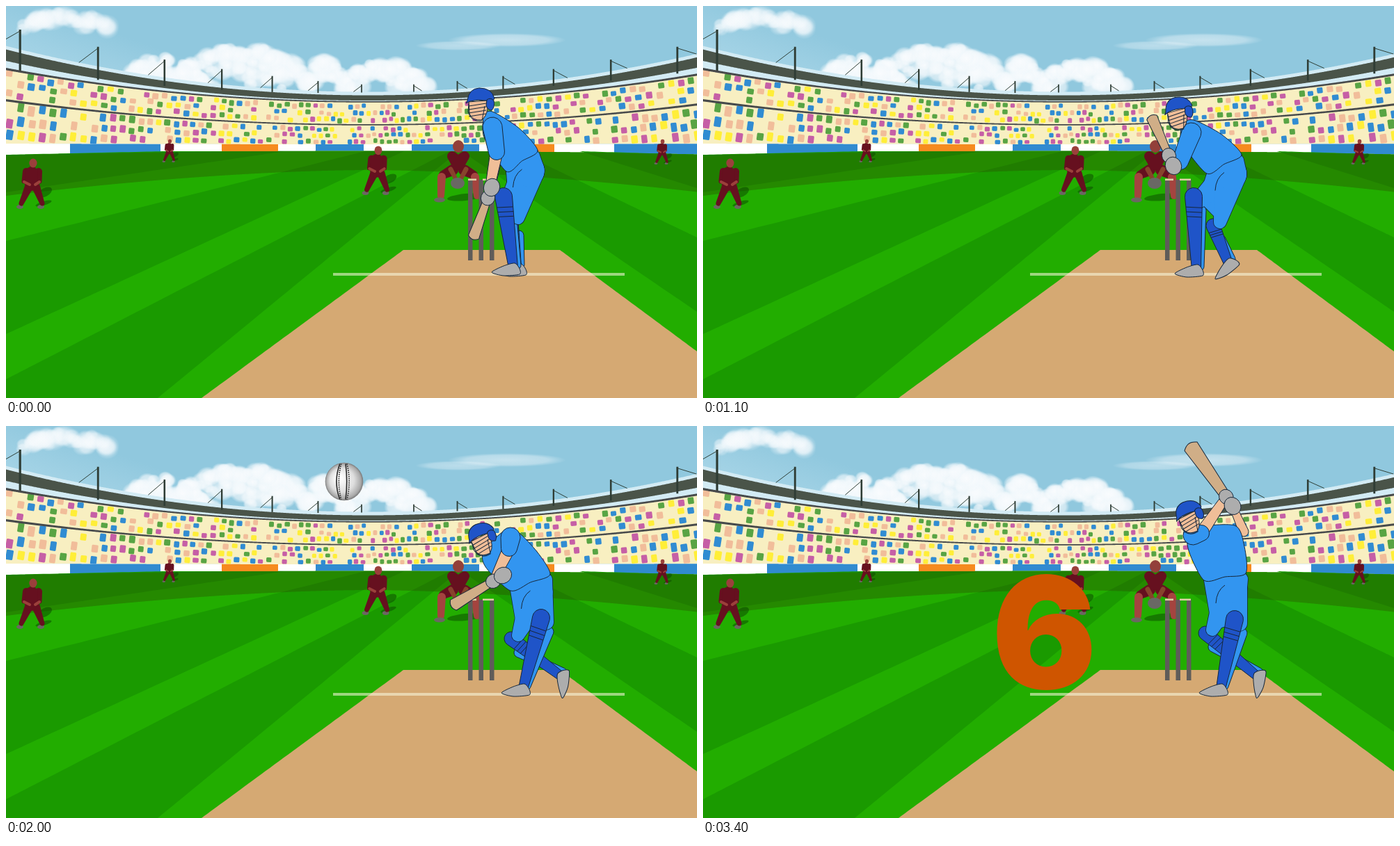
Animation, 993 px wide and 564 px high, one loop 3600 ms. Source, as an HTML page with a canvas:

```html
<!DOCTYPE html>
<html lang="en">
<head>
<meta charset="utf-8">
<title>Cricket six</title>
<style>
html, body { margin: 0; width: 100%; height: 100%; overflow: hidden; }
canvas { display: block; width: 993px; height: 564px; }
</style>
</head>
<body>
<canvas id="stage" width="993" height="564"></canvas>
<script>
const W = 993, H = 564, LOOP = 3600, RAD = Math.PI / 180;
const stage = document.getElementById('stage').getContext('2d');
const INK = '#16273a', BLUE = '#3295f0', NAVY = '#1f54c8', GREY = '#adadad', SKIN = '#f0be98';

const lerp = (a, b, f) => a + (b - a) * f;
const mix = (a, b, f) => a.map((v, i) => lerp(v, b[i], f));
const add = ([x, y], dx, dy) => [x + dx, y + dy];
const polar = ([x, y], deg, r) => [x + r * Math.cos(deg * RAD), y + r * Math.sin(deg * RAD)];

// Closed outline through points; k sets how round the corners are
function outline(points, k = 0) {
  const path = new Path2D(), n = points.length, at = i => points[(i + n) % n];
  path.moveTo(...points[0]);
  for (let i = 0; i < n; i++) {
    const [a, b, d, e] = [at(i - 1), at(i), at(i + 1), at(i + 2)];
    path.bezierCurveTo(b[0] + (d[0] - a[0]) * k, b[1] + (d[1] - a[1]) * k,
      d[0] - (e[0] - b[0]) * k, d[1] - (e[1] - b[1]) * k, ...d);
  }
  path.closePath();
  return path;
}
// Tapered limb between two round joints
function limb(a, ra, b, rb) {
  const path = new Path2D(), dx = b[0] - a[0], dy = b[1] - a[1];
  const dir = Math.atan2(dy, dx);
  const off = Math.acos(Math.max(-1, Math.min(1, (ra - rb) / Math.hypot(dx, dy))));
  path.arc(...a, ra, dir + off, dir - off + 2 * Math.PI);
  path.arc(...b, rb, dir - off, dir + off);
  path.closePath();
  return path;
}
function disc(x, y, rx, ry = rx, rot = 0) {
  const path = new Path2D();
  path.ellipse(x, y, rx, ry, rot, 0, 7);
  return path;
}
function fill(c, color, ...paths) {
  c.fillStyle = color;
  for (const p of paths) c.fill(p);
}
// Inked shape; several paths merge into one outline
function ink(c, color, ...paths) {
  c.strokeStyle = INK;
  c.lineWidth = paths.length > 1 ? 1.6 : 1;
  if (paths.length > 1) paths.forEach(p => c.stroke(p));
  fill(c, color, ...paths);
  if (paths.length === 1) c.stroke(paths[0]);
}
function line(c, color, width, a, b) {
  c.strokeStyle = color;
  c.lineWidth = width;
  c.beginPath();
  c.moveTo(...a);
  c.lineTo(...b);
  c.stroke();
}

/* ---------- ground ---------- */
let seed = 11;
const rnd = () => (seed = (seed * 16807) % 2147483647) / 2147483647;
const bow = x => ((x - 520) / 520) ** 2;
const rim = (base, rise) => x => base - rise * bow(x);
const shift = (f, d) => x => f(x) + d;
const roofTop = rim(123.5, 66), beamTop = rim(128.5, 66), beamEnd = rim(136, 57);
const standTop = rim(138, 48), aisle = rim(171, 36), boardTop = rim(199, 1), boardEnd = rim(208.5, -6);

function band(c, color, top, end, x0 = 0, x1 = W) {
  c.fillStyle = color;
  c.beginPath();
  for (let x = x0; x <= x1; x++) c.lineTo(x, top(x));
  for (let x = x1; x >= x0; x--) c.lineTo(x, end(x));
  c.fill();
}
function puff(c, x, y, rx, ry, alpha) {
  const g = c.createRadialGradient(0, 0, 0, 0, 0, 1);
  g.addColorStop(0, `rgba(250,252,254,${alpha})`);
  g.addColorStop(0.7, `rgba(244,249,252,${alpha * 0.8})`);
  g.addColorStop(1, 'rgba(236,246,251,0)');
  c.save();
  c.translate(x, y);
  c.scale(rx, ry);
  fill(c, g, disc(0, 0, 1));
  c.restore();
}
// Small puffs scattered under a dome
function cloud(c, x, base, w, h, alpha) {
  for (let i = 0; i < w; i++) {
    const u = rnd() * 2 - 1, r = 7 + rnd() * 9;
    const top = (h - r) * Math.sqrt(1 - u * u);
    puff(c, x + u * w, base - top * Math.sqrt(rnd()), r * 1.15, r, alpha);
  }
}
function sky(c) {
  const g = c.createLinearGradient(0, 140, 50, 0);
  g.addColorStop(0, '#b9dfee');
  g.addColorStop(1, '#90c8de');
  c.fillStyle = g;
  c.fillRect(0, 0, W, 210);
  cloud(c, 225, 122, 60, 58, 0.75);
  cloud(c, 340, 124, 100, 76, 0.75);
  cloud(c, 460, 124, 28, 60, 0.75);
  cloud(c, 545, 124, 62, 55, 0.75);
  cloud(c, 85, 36, 66, 38, 0.35);
  puff(c, 720, 49, 85, 10, 0.5);
  puff(c, 650, 57, 62, 7, 0.4);
}
function roof(c) {
  band(c, '#d3ebf4', roofTop, standTop);
  band(c, '#4a5449', beamTop, beamEnd);
  for (let k = 0; k < 7; k++) {
    const d = 37.5 + 62 * k + 0.55 * k ** 3, far = d / 524;
    const top = 114 - 79 * far ** 1.55;
    for (const side of [-1, 1]) {
      const x = 548.5 + side * d, foot = x + side * (10 + 22 * far);
      line(c, '#2f4038', 1, [x, top + 2], [foot, roofTop(foot)]);
      line(c, '#2f3d35', 1.6 + 1.6 * far, [x, top], [x, lerp(roofTop(x), standTop(x), far)]);
    }
  }
}
function crowd(c, top, end, rows) {
  const tints = ['#c65fa6', '#58a444', '#318cd2', '#ffee38', '#f1bd9a'];
  for (let r = 0; r < rows; r++) {
    for (let x = 0; x < W;) {
      const far = Math.sqrt(bow(x)), pitch = (end(x) - top(x)) / rows;
      const w = 5.5 + 3.5 * far + rnd() * 1.5, h = pitch * (0.6 + rnd() * 0.2);
      if (rnd() < 0.82) {
        c.save();
        c.translate(x + w / 2, top(x) + pitch * (r + 0.5) + (rnd() - 0.5) * pitch * 0.35);
        c.rotate((x < 520 ? 1 : -1) * far * 0.16);
        c.fillStyle = tints[Math.floor(rnd() * tints.length)];
        c.beginPath();
        c.roundRect(-w / 2, -h / 2, w, h, 1.6);
        c.fill();
        c.restore();
      }
      x += w + 2 + 3 * far + rnd() * 2;
    }
  }
}
function stands(c) {
  band(c, '#f8efc1', standTop, boardTop);
  crowd(c, shift(standTop, 2), shift(aisle, -2), 3);
  crowd(c, shift(aisle, 2), boardTop, 3);
  for (const edge of [standTop, aisle]) band(c, '#474a4b', shift(edge, -1), x => edge(x) + 0.8 + 1.5 * bow(x));
  band(c, '#ffffff', boardTop, boardEnd);
  for (const [a, b] of [[92, 222], [445, 514], [583, 680], [874, W]]) band(c, '#318bd0', boardTop, boardEnd, a, b);
  for (const [a, b] of [[310, 391], [738, 788]]) band(c, '#f68b1f', boardTop, boardEnd, a, b);
}
function field(c) {
  const mow = (...p) => fill(c, '#1a9a00', outline(p));
  band(c, '#22ad00', boardEnd, () => H);
  mow([0, 338], [516, 209], [572, 209], [0, 472]);
  mow([0, 537], [637, 209], [650, 209], [218, H], [0, H]);
  mow([655, 209], [735, 209], [W, 333], [W, 440]);
  mow([0, 214], [230, 209], [400, 209], [0, 268]);
  mow([825, 209], [W, 214], [W, 262]);
  band(c, 'rgba(42,72,0,.36)', boardEnd, x => 236 + 37 * bow(x) ** 0.85);
  fill(c, '#d5a973', outline([[571, 351], [796, 351], [W, 497], [W, H], [281, H]]));
  c.fillStyle = 'rgba(248,246,220,.58)';
  c.fillRect(470, 384, 419, 4);
}
function fielder(c, x, y, h) {
  const cloth = '#66101f', skin = '#9b403b', shade = 'rgba(10,70,0,.5)';
  c.save();
  c.translate(x, y);
  c.scale(h / 72, h / 72);
  fill(c, shade, disc(18, 48, 11, 6, -0.5), disc(16, 64, 12, 3, -0.3));
  for (const side of [-1, 1]) {
    const foot = side * 15 - 3;
    fill(c, '#6b6762', disc(foot, 69, 5, 3));
    fill(c, cloth, limb([side * 5, 40], 6, [foot + 2, 64], 3.5), limb([side * 9, 18], 5, [side * 11 - 1, 32], 3.5));
  }
  fill(c, cloth, limb([-1, 20], 9, [-2, 37], 9));
  for (const side of [-1, 1]) fill(c, skin, limb([side * 11 - 1, 33], 2, [side * 4, 37], 2));
  fill(c, skin, disc(1, 6, 5.6, 6.5));
  c.restore();
}
function keeper(c) {
  const cloth = '#66101f';
  fill(c, 'rgba(10,70,0,.5)', disc(660, 275, 26, 5, -0.1));
  c.save();
  c.translate(650, 0);
  for (const side of [-1, 1]) {
    fill(c, cloth, limb([side * 8, 236], 8, [side * 22, 243], 6));
    fill(c, '#a4443f', limb([side * 24, 246], 6, [side * 26 + 1, 273], 5));
    fill(c, cloth, limb([0, 226], 10, [side * 9, 216], 7));
    fill(c, '#87432c', limb([side * 11, 235], 3.5, [side * 4, 248], 3));
  }
  fill(c, '#6b6762', disc(-27, 279, 8, 3.5));
  fill(c, '#696864', disc(-1, 255, 10, 8));
  fill(c, '#93403a', disc(0, 202, 8, 9));
  c.restore();
}
function stumps(c) {
  c.fillStyle = '#5f5c59';
  for (const x of [664, 679.5, 695]) c.fillRect(x, 250, 6.5, 116);
  c.fillStyle = '#dccfa6';
  c.fillRect(664, 248.5, 12, 2.6);
  c.fillRect(685, 248.5, 16, 2.6);
}

const ground = document.createElement('canvas');
ground.width = W;
ground.height = H;
const back = ground.getContext('2d');
for (const part of [sky, roof, stands, field]) part(back);
for (const spot of [[38, 220, 72], [235, 192, 33], [534, 202, 70], [943, 192, 36]]) fielder(back, ...spot);
keeper(back);
stumps(back);

/* ---------- batsman: joints at six key times ---------- */
const TIMES = [0, 700, 1100, 1600, 2000, 2400];
const JOINTS = {
  head: '682,132 684,139 683,145 683,160 682,154 697,122',
  shoulder: '699,152 702,153 705,164 708,168 724,147 764,143',
  rear: '764,208 762,234 774,214 777,230 782,213 780,212',
  belly: '719,238 708,242 724,241 723,262 725,237 720,222',
  armTop: '699,174 697,178 702,182 703,184 725,160 704,157',
  elbow: '705,210 694,214 686,224 688,220 723,176 716,154',
  farElbow: '704,225 694,232 690,225 716,255 720,195 777,152',
  hand: '698,261 692,249 676,230 669,258 714,215 761,115',
  kneeF: '715,274 683,278 705,274 756,279 769,276 764,278',
  ankleF: '729,377 700,377 709,379 742,381 743,378 744,378',
  kneeB: '726,310 723,306 733,316 722,326 726,306 722,298',
  ankleB: '734,376 731,376 754,368 755,370 795,358 794,358',
  // angle and length
  bat: '110,80 158,57 246,80 325,45 509,87 595,110',
  // head and rear shoe
  turn: '0,0 -4,-12 -10,-35 0,-30 -22,-80 -22,-75'
};
for (const name in JOINTS) JOINTS[name] = JOINTS[name].split(' ').map(p => p.split(',').map(Number));

function poseAt(t) {
  let i = 0;
  while (i < TIMES.length - 2 && t >= TIMES[i + 1]) i++;
  const f = Math.min(1, (t - TIMES[i]) / (TIMES[i + 1] - TIMES[i]));
  const pose = {};
  for (const name in JOINTS) pose[name] = mix(JOINTS[name][i], JOINTS[name][i + 1], f);
  return pose;
}
function turned(c, [x, y], deg, draw) {
  c.save();
  c.translate(x, y);
  c.rotate(deg * RAD);
  draw();
  c.restore();
}
function drawBat(c, hand, [angle, len]) {
  const w = len * 0.1;
  turned(c, hand, angle, () => ink(c, '#d0ae87', new Path2D(
    `M10 ${-w * 0.6}L${len * 0.95} ${-w}Q${len * 1.04} 0 ${len * 0.95} ${w}L10 ${w * 0.6}Z`)));
}
function drawHead(c, at, deg) {
  turned(c, at, deg, () => {
    ink(c, SKIN, new Path2D('M-17 6L9 4L10 16Q8 28 1 32Q-12 33 -16 23Z'));
    for (let y = 8; y < 28; y += 5) line(c, INK, 1, [-17, y + 4], [8, y]);
    c.stroke(new Path2D('M-17 8L-18 20Q-14 36 2 33L6 12'));
    ink(c, NAVY, new Path2D('M-19 4Q-17 -13 -2 -14Q16 -14 20 1L18 4L8 4Q-4 2 -15 5L-21 8Z'));
    ink(c, NAVY, new Path2D('M9 3Q14 -1 19 4Q21 13 16 18Q10 18 8 11Z'));
  });
}
function drawShoe(c, ankle, deg) {
  turned(c, ankle, deg, () =>
    ink(c, GREY, outline([[-31, 6], [-14, -3], [2, -7], [9, 1], [9, 9], [-14, 11]], 0.12)));
}
function drawShin(c, knee, ankle) {
  ink(c, BLUE, limb(add(knee, 11, 20), 7, add(ankle, 5, -4), 6));
}
function drawPad(c, knee, ankle, r) {
  ink(c, NAVY, limb(knee, r, ankle, 6.5));
  const dir = Math.atan2(ankle[1] - knee[1], ankle[0] - knee[0]) / RAD;
  for (let f = 0.15; f < 0.3; f += 0.065) {
    const mid = mix(knee, ankle, f), w = lerp(r, 6.5, f);
    line(c, INK, 1, polar(mid, dir + 95, w), polar(mid, dir - 85, w));
  }
}
function drawBatsman(c, p) {
  const waist = mix(p.belly, p.rear, 0.5), hip = add(waist, 9, 14);
  const neck = add(p.head, 5, 26), chest = add(mix(neck, p.belly, 0.35), -11, 3);
  const spine = add(mix(p.shoulder, p.rear, 0.5), 6, -4);
  const grip = polar(p.hand, p.bat[0], 16);
  const thighF = add(p.kneeF, 7, 6), thighB = add(p.kneeB, 10, -5);
  c.lineJoin = 'round';

  drawBat(c, p.hand, p.bat);
  ink(c, SKIN, limb(p.farElbow, 7, p.hand, 5));
  drawShin(c, p.kneeB, p.ankleB);
  drawPad(c, p.kneeB, p.ankleB, 10);
  drawShoe(c, add(p.ankleB, 4, 2), p.turn[1]);
  drawShin(c, p.kneeF, p.ankleF);
  ink(c, BLUE, outline([p.belly, p.rear, hip, thighB]), outline([p.belly, hip, thighB, thighF]),
    limb(hip, 23, thighF, 11), limb(hip, 23, thighB, 9), limb(hip, 23, add(p.rear, -6, 8), 9));
  c.lineWidth = 1;
  const [x, y] = waist;
  c.stroke(new Path2D(`M${x} ${y + 12}Q${x - 12} ${y + 20} ${x - 13} ${y + 38}`));
  drawPad(c, p.kneeF, p.ankleF, 12.5);
  drawShoe(c, p.ankleF, 0);
  ink(c, BLUE, outline([neck, p.shoulder, spine, p.rear, waist, p.belly, chest], 0.13));
  ink(c, SKIN, limb(p.elbow, 9, grip, 6));
  ink(c, BLUE, limb(p.armTop, 14, p.elbow, 11.5));
  drawHead(c, p.head, p.turn[0]);
  ink(c, GREY, disc(...grip, 11, 10, p.bat[0] * RAD));
  ink(c, GREY, disc(...p.hand, 13, 11.5, p.bat[0] * RAD));
}

/* ---------- ball and score ---------- */
// x, y, radius every 200 ms from the first sight of the ball
const FLIGHT = [[399, 102, 16], [600, 400, 16], [655, 265, 16], [486, 80, 27.3]];
function drawBall(c, t) {
  const leg = (t - 1400) / 200;
  if (leg < 0 || leg > 3) return;
  const i = Math.min(2, Math.floor(leg));
  const [x, y, r] = mix(FLIGHT[i], FLIGHT[i + 1], leg - i);
  const g = c.createRadialGradient(-0.3, -0.2, 0.1, 0, 0, 1);
  g.addColorStop(0, '#ffffff');
  g.addColorStop(0.6, '#dedede');
  g.addColorStop(0.9, '#a9a9a9');
  g.addColorStop(1, '#777777');
  c.save();
  c.translate(x, y);
  c.scale(r, r);
  fill(c, g, disc(0, 0, 1));
  c.strokeStyle = '#2c2c2c';
  c.lineWidth = 0.06;
  for (const k of [-0.45, 0.15]) {
    for (const stitched of [0, 1]) {
      const s = k + stitched * 0.14;
      c.setLineDash(stitched ? [0.06, 0.05] : []);
      c.stroke(new Path2D(`M${s * 0.5} -.94Q${s * 1.3} 0 ${s * 0.5} .94`));
    }
  }
  c.restore();
}
function drawScore(c, t) {
  if (t < 2400) return;
  const face = size => `900 ${size}px Inter, "Liberation Sans", sans-serif`;
  const tall = 39 + (t - 2400) * 0.128;
  c.font = face(200);
  const m = c.measureText('6');
  const k = tall / (m.actualBoundingBoxAscent + m.actualBoundingBoxDescent);
  c.font = face(200 * k);
  c.fillStyle = '#cf5500';
  c.fillText('6', 490.5 - k * (m.actualBoundingBoxRight - m.actualBoundingBoxLeft) / 2,
    380 - k * m.actualBoundingBoxDescent);
}

// Poses hold for 100 ms, then for 200 ms once the shot is played
function render(now) {
  const t = now % LOOP, step = t < 2200 ? 100 : 200;
  const held = Math.floor(t / step) * step;
  stage.drawImage(ground, 0, 0);
  drawBatsman(stage, poseAt(held));
  drawBall(stage, held);
  drawScore(stage, held);
}
const start = performance.now();
(function frame() {
  render(performance.now() - start);
  requestAnimationFrame(frame);
})();
</script>
</body>
</html>
```
